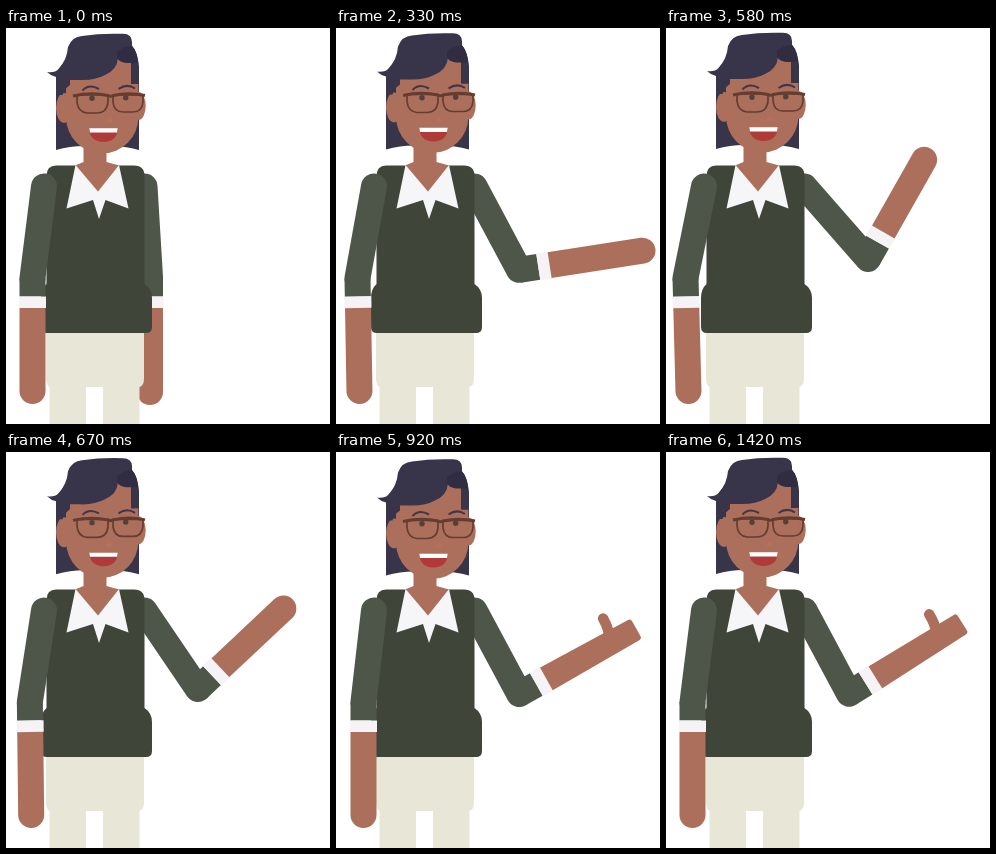
Write an HTML page that moves like this. It is 324 by 396 pixels and loops after 2.51 s.

```html
<!DOCTYPE html>
<html lang="en">
<head>
<meta charset="utf-8">
<title>Waving character</title>
<style>
  html, body { margin: 0; width: 100%; height: 100%; overflow: hidden; background: #fff; }
  svg { display: block; width: 100vw; height: 100vh; }
</style>
</head>
<body>
<svg viewBox="0 0 324 396">
  <g id="right"></g>

  <path fill="#e8e7d7" d="M40 300H138V350Q138 358 133.500 359V396H97V359H80V396H43.500V359Q40 357 40 350Z"/>
  <path fill="#40453a" d="M50 137.500H128Q138.500 137.500 138.500 148V256Q146 261 146 270V299Q146 305 140 305H41Q35 305 35 299V270Q35 261 40.500 256V148Q40.500 137.500 50 137.500Z"/>

  <g id="left"></g>

  <path id="backHair" fill="#38344a" d="M50 45V122Q64 118 78 118H104Q119 118 133 122V40Q131 24 126 18H70Z"/>
  <path fill="#ac6f5b" d="M77.500 112H100.500V134L113 137.500L92 164L69 137.500L77.500 134Z"/>
  <path fill="#f6f5f7" d="M69.500 137L92 163.500L113 137L122.500 180.500L99.500 172L93 191L87 172L60.500 180.500Z"/>

  <g id="head">
    <g fill="#ac6f5b">
      <ellipse cx="58" cy="80" rx="8" ry="15"/>
      <ellipse cx="132.500" cy="78" rx="7.200" ry="14"/>
      <path d="M60 45V89A36.200 36.500 0 0 0 132.400 89V56H125V30H80Z"/>
    </g>
    <path fill="#38344a" d="M41 44Q49 45 52.500 41Q61 32 62 19Q66 8.500 76 8Q95 5 117 5.800Q126 6 126 14V18Q132 24 133 40V56H125.500V33L112 30Q111 42 99 47Q89 52.500 74 52H64V57Q58 61 56.500 67H50V49Q45 48 41 44Z"/>
    <path fill="#302c42" d="M111 24Q117 18 126 18Q131 23 132 35H120Q113 34 111 30Z"/>
    <g fill="none" stroke="#40364a" stroke-width="2">
      <path d="M76.500 62.500Q83 55.500 93 61"/>
      <path d="M112.500 61Q121 55 129 60.500"/>
    </g>
    <g fill="#553f39">
      <circle cx="86" cy="70.300" r="2.700"/>
      <circle cx="119.700" cy="69.700" r="2.700"/>
    </g>
    <g fill="none" stroke="#653d30" stroke-width="1.700">
      <path d="M71 67H102V74Q101 85 91 85H81Q72 84 71 74Z"/>
      <path d="M107 67H137V74Q136 84 127 84H117Q108 84 107 74Z"/>
      <path stroke-width="3" d="M67 68Q85 64 102 67.500Q104.500 69 107 67.500Q123 64 139 67.500"/>
    </g>
    <path fill="#b7705a" d="M103 89L108 94H99Z"/>
    <path fill="#b03a38" d="M83.300 101H111.700Q111 113.500 97.500 114Q84 113.500 83.300 101Z"/>
    <path fill="#fff" d="M83.300 100.300H111.700L111 104.500H84Z"/>
  </g>
</svg>
<script>
const LOOP = 2510;
const LAST_STEP = 17;
const SLEEVE = "#4e5649";
const $ = id => document.getElementById(id);
const mix = (a, b, k) => a + (b - a) * k;

// ex, ey: right elbow; turn: forearm angle from straight down; len: elbow to fingertip
// lx, lturn: left elbow shift and forearm angle; bob: head shift; thumb: open hand
const keys = [
  { t: 0, ex: 144, ey: 249, turn: 0, len: 128, lx: 0, lturn: 0, bob: 0, thumb: 0 },
  { t: 170, ex: 151.5, ey: 250.5, turn: 24.2, len: 129, lx: -1, lturn: 0, bob: 0, thumb: 0 },
  { t: 330, ex: 183, ey: 241.8, turn: 98.8, len: 138, lx: -5, lturn: 1, bob: -0.5, thumb: 0 },
  { t: 580, ex: 202, ey: 231, turn: 150.5, len: 127, lx: -7, lturn: 1.5, bob: -1, thumb: 0 },
  { t: 750, ex: 183.3, ey: 242, turn: 118.8, len: 133.5, lx: 1, lturn: 0, bob: 1.5, thumb: 0 },
  { t: 920, ex: 183.3, ey: 242, turn: 119.2, len: 134, lx: 1, lturn: 0, bob: 1.5, thumb: 1 },
  { t: 1170, ex: 183, ey: 241.7, turn: 121.9, len: 133.5, lx: 0, lturn: 0, bob: 0, thumb: 1 }
];

function slope(name, i) {
  if (i === 0 || i === keys.length - 1) return 0;
  const [a, b, c] = [keys[i - 1], keys[i], keys[i + 1]];
  const before = (b[name] - a[name]) / (b.t - a.t);
  const after = (c[name] - b[name]) / (c.t - b.t);
  return before * after <= 0 ? 0 : 2 * before * after / (before + after);
}

// Smooth interpolation that never overshoots a key
function valueAt(name, t) {
  const i = keys.findIndex(k => k.t > t) - 1;
  if (i < 0) return keys[keys.length - 1][name];
  const a = keys[i], b = keys[i + 1], d = b.t - a.t, u = (t - a.t) / d;
  const s = u * u * (3 - 2 * u);
  return mix(a[name], b[name], s)
    + d * u * (1 - u) * ((1 - u) * slope(name, i) - u * slope(name, i + 1));
}

function buildArm(id, cuff) {
  const g = $(id);
  g.innerHTML = `<path class="upper" fill="none" stroke="${SLEEVE}" stroke-width="26" stroke-linecap="round"/>
    <g class="lower">
      <path class="hand" fill="#ac6f5b"/>
      <path class="thumb" fill="none" stroke="#ac6f5b" stroke-width="10.5" stroke-linecap="round"/>
      <rect x="-13" width="26" height="${cuff}" fill="${SLEEVE}"/>
      <rect x="-13.5" y="${cuff}" width="27" height="11.5" fill="#f5f3f5"/>
    </g>`;
  const part = name => g.querySelector("." + name);
  const [upper, lower, hand, finger] = ["upper", "lower", "hand", "thumb"].map(part);

  return (sx, sy, ex, ey, turn, len, thumb) => {
    const w = mix(13, 11.5, thumb), r = mix(13, 3, thumb);
    upper.setAttribute("d", `M${sx} ${sy}L${ex} ${ey}`);
    lower.setAttribute("transform", `translate(${ex} ${ey}) rotate(${-turn})`);
    hand.setAttribute("d", `M-13 ${cuff + 8}L${-w} ${len - r}
      A${r} ${r} 0 0 0 ${r - w} ${len}H${w - r}A${r} ${r} 0 0 0 ${w} ${len - r}L13 ${cuff + 8}Z`);
    finger.setAttribute("d", `M5 106Q${mix(5, 13, thumb)} 110 ${mix(6, 25, thumb)} 110`);
  };
}

const drawRight = buildArm("right", 19.5);
const drawLeft = buildArm("left", 18.5);
const stepTime = k => 10 * Math.round(k * 8.345);

function draw(time) {
  let step = LAST_STEP;
  while (stepTime(step) > time) step--;
  const v = name => valueAt(name, stepTime(step));

  drawRight(138.5, 158.5, v("ex"), v("ey"), v("turn"), v("len"), v("thumb"));
  drawLeft(38, 158.5, 26.5 + v("lx"), 250, v("lturn"), 126, 0);

  const shift = `translate(0 ${v("bob")})`;
  $("head").setAttribute("transform", shift);
  $("backHair").setAttribute("transform", shift);
}

const start = performance.now();
function tick() {
  draw((performance.now() - start) % LOOP);
  requestAnimationFrame(tick);
}
tick();
</script>
</body>
</html>
```
